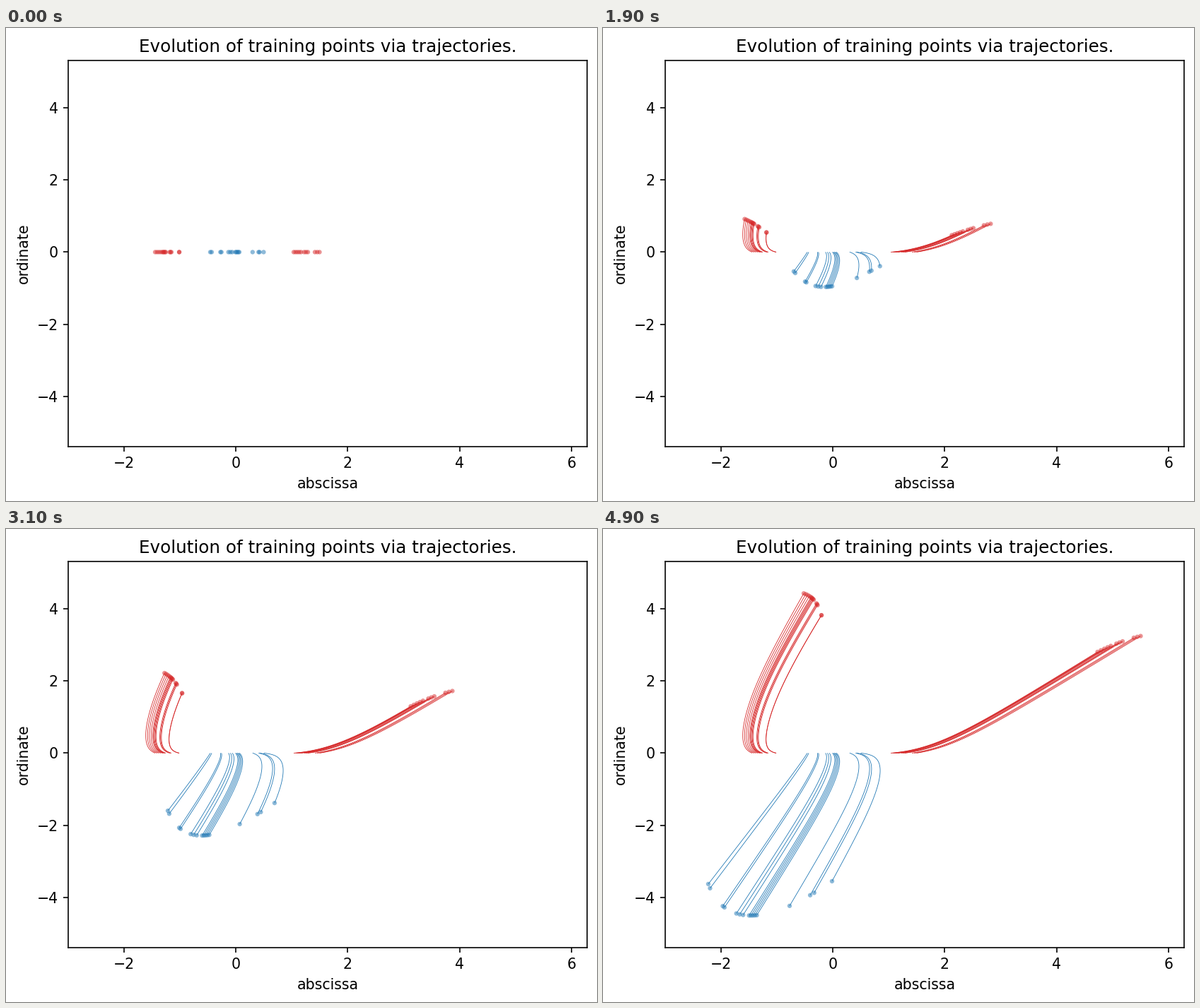
A matplotlib script for the animation above (5000 ms loop, 836 by 670 pixels).

```python
import numpy as np
import matplotlib.pyplot as plt
from matplotlib.animation import FuncAnimation
from matplotlib.collections import LineCollection

DPI, W, H = 148, 836, 670
FRAMES, INTERVAL, SUBSTEPS = 50, 100, 4
RED, BLUE = "#d62728", "#1f77b4"

steps = np.arange((FRAMES - 1) * SUBSTEPS + 1) * INTERVAL / 1000 / SUBSTEPS

# Each group: clusters of starts (first, last, count) and a few key starts with
# their end point, initial sideways drift and the times their turn sets in.
GROUPS = [
    dict(color=RED, widths=(0.8, 0.6),
         clusters=[(-1.44, -1.34, 4), (-1.31, -1.25, 5), (-1.18, -1.15, 3),
                   (-1.01, -1.01, 2)],
         keys=[-1.44, -1.29, -1.01],
         end_x=[-0.518, -0.373, -0.202], end_y=[4.428, 4.301, 3.822],
         drift=[-0.29, -0.266, -0.221],
         onset_x=[1.75, 1.94, 2.3], onset_y=[1.28, 1.42, 1.8]),
    dict(color=BLUE, widths=(0.6, 0.6),
         clusters=[(-0.455, -0.43, 2), (-0.274, -0.256, 2), (-0.13, -0.063, 3),
                   (-0.006, 0.063, 5), (0.301, 0.301, 1), (0.408, 0.426, 2),
                   (0.498, 0.498, 1)],
         keys=[-0.455, -0.265, 0.063, 0.301, 0.498],
         end_x=[-2.224, -1.95, -1.358, -0.771, -0.013],
         end_y=[-3.63, -4.26, -4.495, -4.236, -3.552],
         drift=[0.006, 0.07, 0.168, 0.221, 0.259],
         onset_x=[1.82, 1.55, 1.53, 1.87, 2.4],
         onset_y=[1.76, 1.38, 1.25, 1.58, 2.1]),
    dict(color=RED, widths=(0.6, 0.6),
         clusters=[(1.036, 1.166, 5), (1.223, 1.289, 3), (1.415, 1.497, 3)],
         keys=[1.036, 1.289, 1.497],
         end_x=[4.732, 5.18, 5.502], end_y=[2.805, 3.098, 3.245],
         drift=[0.36, 0.43, 0.499],
         onset_x=[1.25, 1.11, 1.0], onset_y=[1.6, 1.22, 1.0]),
]


def travel(onset, width):
    """Share of the way covered when speed rises along a logistic curve."""
    ramp = np.logaddexp(0, (steps - onset[:, None]) / width)
    ramp -= ramp[:, :1]
    return ramp / ramp[:, -1:]


def trajectories(group):
    """Paths shaped (point, time step, 2)."""
    starts = np.concatenate([np.linspace(*c) for c in group["clusters"]])
    fields = ("end_x", "end_y", "drift", "onset_x", "onset_y")
    rows = np.transpose([group[name] for name in fields])
    n = len(rows)
    fit = np.polyfit(group["keys"], rows, n - 1)
    end_x, end_y, drift, onset_x, onset_y = (np.vander(starts, n) @ fit).T
    width_x, width_y = group["widths"]

    turn = end_x - starts - drift * steps[-1]
    x = (starts[:, None] + drift[:, None] * steps
         + turn[:, None] * travel(onset_x, width_x))
    y = end_y[:, None] * travel(onset_y, width_y)
    return np.stack([x, y], axis=-1)


group_paths = [trajectories(group) for group in GROUPS]
paths = np.concatenate(group_paths)
colors = [g["color"] for g, p in zip(GROUPS, group_paths) for _ in p]

plt.rcParams["font.family"] = "DejaVu Sans"
# The tiny surplus keeps the pixel size from rounding down.
fig = plt.figure(figsize=((W + 0.001) / DPI, (H + 0.001) / DPI), dpi=DPI)
ax = fig.add_axes([88 / W, 77 / H, 734.08 / W, 546.96 / H])
ax.set(xlim=(-2.994, 6.28), ylim=(-5.394, 5.312),
       xticks=range(-2, 7, 2), yticks=range(-4, 5, 2),
       xlabel="abscissa", ylabel="ordinate",
       title="Evolution of training points via trajectories.")

trails = LineCollection([], colors=colors, linewidths=0.4, zorder=2)
ax.add_collection(trails, autolim=False)
dots = ax.scatter(*paths[:, 0].T, s=9.5, c=colors, alpha=0.5, linewidths=0, zorder=3)


def update(frame):
    now = frame * SUBSTEPS
    trails.set_segments(list(paths[:, :now + 1]) if frame else [])
    dots.set_offsets(paths[:, now])
    return trails, dots


anim = FuncAnimation(fig, update, frames=FRAMES, interval=INTERVAL,
                     repeat=True, repeat_delay=0)
plt.show()
```
